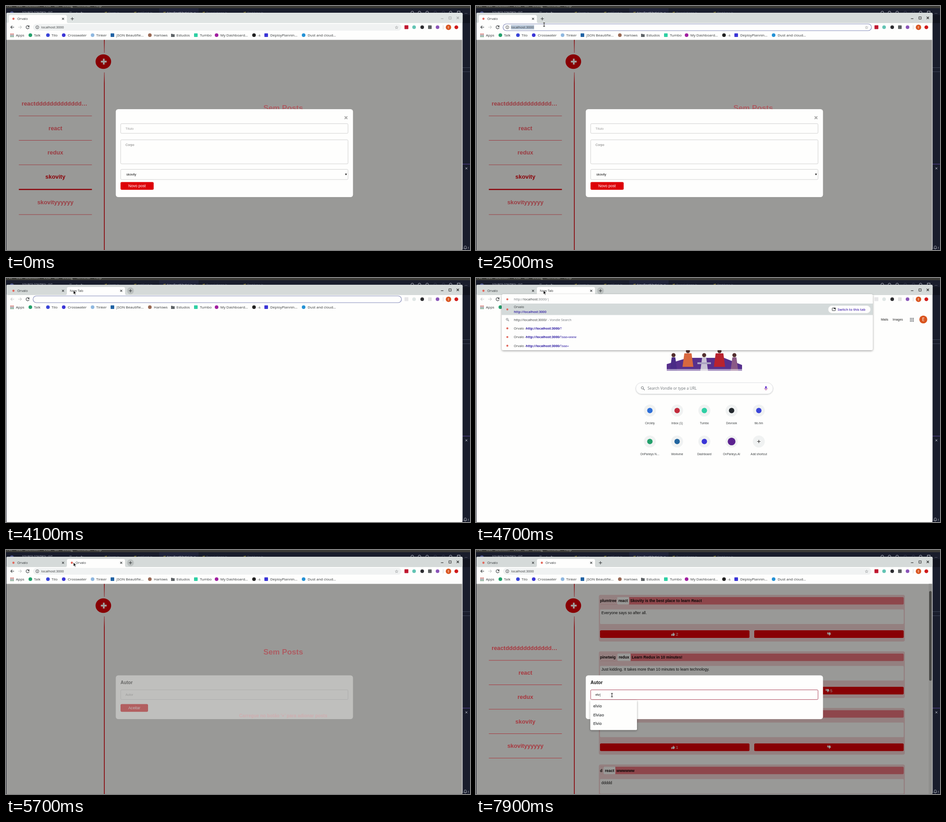
An HTML page that plays this animation: 1029x544 px, repeating every 8 s.

```html
<!DOCTYPE html>
<html lang="pt">
<head>
<meta charset="utf-8">
<style>
html, body { margin: 0; width: 100%; height: 100%; overflow: hidden; background: #fefefd }
svg { display: block; width: 100%; height: 100% }
text { white-space: pre }
.ui { font-family: "Open Sans", "Noto Sans", sans-serif }
.page { font-family: "Liberation Sans", Arial, sans-serif }
.sym { font-family: "DejaVu Sans", sans-serif }
</style>
</head>
<body>
<svg id="stage" viewBox="0 0 1029 544"></svg>
<script>
// Page colours; the dim ones lie under the modal backdrop
const RED = '#dd0008', DIM_RED = '#880004', DIM_WHITE = '#999997', INK = '#303436';

// SVG helpers
const text = (x, y, size, str, fill = INK, extra = '', font = 'ui') =>
  `<text class="${font}" x="${x}" y="${y}" font-size="${size}" fill="${fill}" ${extra}>${str}</text>`;
const page = (x, y, size, str, fill, extra) => text(x, y, size, str, fill, extra, 'page');
const rect = (x, y, w, h, fill, r = 0, extra = '') =>
  `<rect x="${x}" y="${y}" width="${w}" height="${h}" rx="${r}" fill="${fill}" ${extra}/>`;
const dot = (x, y, r, fill, extra = '') => `<circle cx="${x}" cy="${y}" r="${r}" fill="${fill}" ${extra}/>`;
const fill = (d, color, extra = '') => `<path d="${d}" fill="${color}" ${extra}/>`;
const line = (d, color, w = 1.1, extra = '') =>
  `<path d="${d}" fill="none" stroke="${color}" stroke-width="${w}" ${extra}/>`;
const group = (id, ...parts) => `<g id="${id}">${parts.join('')}</g>`;
const cross = (x, y, r, color, w = 1.1) =>
  line(`M${x - r} ${y - r}l${2 * r} ${2 * r}m0 ${-2 * r}l${-2 * r} ${2 * r}`, color, w);
const plus = (x, y, r, color, w = 1.1) => line(`M${x - r} ${y}h${2 * r}M${x} ${y - r}v${2 * r}`, color, w);
const field = (y, h, color = '#c4c4c4') =>
  rect(254.3, y, 504.2, h, '#fefefd', 2.2, `stroke="${color}" stroke-width=".8"`);
const BOLD = 'font-weight="700" ', SEMI = 'font-weight="600"', MID = 'text-anchor="middle"';

function editor() {
  const menu = [[2, 'File'], [23, 'Edit'], [42, 'Selection'], [83, 'View'], [107, 'Go'],
    [125, 'Debug'], [156, 'Terminal'], [196, 'Help']];
  const tabs = [[219, 'Form.js'], [284, 'getField.js'], [349, 'NewPostModal.js  ×'],
    [436, 'Translations.js'], [527, 'TextArea.js']];
  return rect(0, 0, 1029, 544, '#191d2c') + rect(0, 0, 1029, 5, '#3a3a36') +
    menu.map(([x, s]) => text(x, 2.2, 7.6, s, '#b5b5ae')).join('') +
    rect(340, 5, 87, 12, '#20243a') +
    dot(13, 16, 4, '#4c558c') + text(36, 17.4, 6.2, 'SOURCE CONTROL: GIT', '#a9adba') +
    text(140, 17.5, 7, '☰   ✓   ↻   ⋯', '#a9adba', '', 'sym') +
    tabs.map(([x, s], i) => text(x, 18, 6.4, 'JS', '#b5a53c', BOLD) +
      text(x + 8, 18, 7, s, i == 2 ? '#d0d2dc' : '#626780')).join('') +
    [901, 917, 934, 952, 970, 986].map((x, i) =>
      dot(x, 14.5, 3, 'none', `stroke="${i == 3 || i == 4 ? '#3c4054' : '#b9bcc8'}"`)).join('') +
    rect(1001, 11.5, 6, 6, 'none', 0, 'stroke="#c8cad2"') + text(1017, 17, 8, '…', '#c8cad2') +
    rect(1012, 20, 17, 18, '#11141f') +
    line('M1012 137.5h17M1012 146.5h17', '#3d4457', 1) + line('M1012 352.5h17', '#5c479c', 1) +
    cross(1021, 362, 2.2, '#c5c8d2', .9) +
    line('M1015 540.5h7l-1.2-1.6v-2q0-2-2.3-2t-2.3 2v2zM1017.5 542h2', '#c5c8d2', .8) +
    text(1023.5, 541.5, 7, '1', '#c5c8d2');
}

function bookmarks() {
  const items = [
    [54, 62, '#23a06b', 'Talk'], [93, 101, '#3a45d8', 'Tilo'], [128, 137, '#3a35d6', 'Crosswater'],
    [192, 200, '#8fb8e0', 'Tinker'], [236, 245, '#2163a5', 'JSON Beautifie…', 1],
    [319, 328, '#9a6a55', 'Harlows'], [0, 378, '', 'Estudos'], [421, 430, '#2fcfa4', 'Tumbo', 1],
    [467, 475.5, '#a01fa0', 'My Dashboard…'], [550, 558, '#222', '-s'],
    [577, 586, '#3a35d6', 'DeployPlannin…', 1], [660, 669, '#2492d6', 'Dust and cloud…']];
  let out = text(22, 68, 8, 'Apps');
  for (let i = 0; i < 9; i++)
    out += rect(9.5 + i % 3 * 2.9, 61.5 + (i / 3 | 0) * 2.9, 1.9, 1.9, ['#c8443c', '#4a5560', '#3a7c55'][i / 3 | 0]);
  out += fill('M366 62h3l1 1h4v6h-8z', '#5f6468');
  for (const [ix, tx, color, name, square] of items)
    out += (!ix ? '' : square ? rect(ix - 4, 61, 8, 8, color, 1) : dot(ix, 65, 4, color)) + text(tx, 68, 8, name);
  return out;
}

const tabLabel = (x, tx, s) => dot(x, 28.5, 2.4, '#e2685c') + text(tx, 31.2, 7.5, s);

function browser() {
  const ext = dim => rect(883.7, 43, 8.6, 8.6, dim ? '#e6e6e8' : '#c01830', 1) +
    dot(905, 47.3, 4, dim ? '#dfe6e5' : '#63c4b4') + dot(923, 47.3, 4, '#2c2c30') +
    rect(936, 43.3, 8, 8, dim ? '#e2e2e2' : '#5b5f60', 1);
  const backArrow = color => line('M18 47.3h-7.5m3.4-3.4l-3.4 3.4l3.4 3.4', color);
  return rect(1, 15, 1011.5, 529, '#fefefd', 3) +
    group('stripIdle', rect(1, 15, 1011.5, 23, '#dfe4e3', 3)) +
    group('stripActive', rect(1, 15, 1011.5, 23, '#d5dad9', 3)) +
    rect(1, 38, 1011, 37.5, '#fefefd') +
    group('oneTab', fill('M3 38Q6 38 6 34V24Q6 20 10 20H131Q135 20 135 24V34Q135 38 138 38z', '#fefefd'),
      group('plusHover', dot(147, 28.7, 7.7, '#a9aead')), plus(147, 28.5, 3.5, INK)) +
    group('twoTabs', fill('M132 38Q135 38 135 34V24Q135 20 139 20H260Q264 20 264 24V34Q264 38 267 38z', '#fefefd'),
      group('plusRing', dot(276, 28.5, 7.7, '#bcc1c0')), plus(276, 28.5, 3.5, INK), cross(255.5, 28.5, 2.2, INK)) +
    tabLabel(16.5, 25, 'Orvalo') + cross(126.5, 28.5, 2.2, INK) +
    group('newTabName', text(141.5, 31.2, 7.5, 'New Tab')) +
    group('loadedName', tabLabel(146, 154, 'Orvalo')) +
    ['#a2a5a5', '#222'].map((c, i) => group('win' + i, line('M964.5 28.3h5.5', c),
      rect(982.2, 24.2, 5, 5, 'none', 0, `stroke="${c}"`), cross(1002, 26.5, 2.5, c))).join('') +
    group('back', backArrow(INK)) + group('backDim', backArrow('#c4c6c6')) +
    line('M27 47.3h7.5m-3.4-3.4l3.4 3.4l-3.4 3.4', '#c4c6c6') +
    group('reload', line('M50.6 45a3.5 3.5 0 1 0 .8 3.2', INK), fill('M51.8 43v3.8h-3.8z', INK)) +
    group('stop', cross(48, 47.3, 3, INK)) +
    rect(60, 40, 817, 15, '#f0f2f2', 7.5) +
    group('focusRing', rect(60, 40, 817, 15, '#fefefd', 7.5, 'stroke="#8087b8" stroke-width="1.2"')) +
    group('selection', rect(77.5, 42.3, 51.5, 10, '#b9c8da')) +
    group('address', dot(69.5, 47.4, 3.4, 'none', `stroke="${INK}" stroke-width=".8"`),
      line('M69.5 45.3v1M69.5 47v2.4', INK, .9), text(78, 50, 7.45, 'localhost:3000'),
      text(862, 50.8, 9.5, '☆', INK, '', 'sym')) +
    group('ext', ext(false)) + group('extDim', ext(true)) +
    dot(957, 47.3, 4, '#8a54b8') + line('M969.5 43v9', '#d5d5d5') +
    dot(981.3, 47.4, 6, '#d9541e') + text(981.3, 49.8, 6.5, 'E', '#fff', MID) +
    dot(998.7, 47.4, 4.2, '#d01a1a') + bookmarks();
}

function newTab() {
  const cells = [['#2e6fd8', 'Circlely'], ['#c22b3c', 'Inbox (1)'], ['#2fcfa4', 'Tumbo'], ['#24292e', 'Devrook'],
    ['#3a45d8', 'tilo.hm'], ['#23a06b', 'OnParleys N…'], ['#22659f', 'Workvine'], ['#3a35d6', 'Dashboard'],
    ['#5c2390', 'OnParleys.AI'], ['', 'Add shortcut']];
  const people = [[438, '#4a2b86', 8], [470, '#d8683f', 16], [506, '#c9c3d4', 9], [540, '#b8232f', 17], [573, '#8a5a86', 9]];
  const art = fill('M423 207V192L470 178H550L590 194V207z', '#57308c') +
    people.map(([x, c, w]) => dot(x, w > 12 ? 163 : 172, 4.5, '#54302f') +
      fill(`M${x - w / 2} ${w > 12 ? 168 : 177}h${w}l4 30h${-w - 8}z`, c)).join('') +
    rect(491, 188, 30, 4, '#aaa2c0') + rect(423, 203, 167, 5, '#fefefd', 0, 'opacity=".5"');
  let grid = '';
  cells.forEach(([c, name], i) => {
    const x = 385.6 + i % 5 * 60.4, y = i < 5 ? 295.5 : 364.5;
    grid += dot(x, y, 13.3, '#f0f2f2') + (c ? dot(x, y, i == 8 ? 8.6 : 6, c) : plus(x, y, 3.6, '#222')) +
      page(x, y + 30, 6.45, name, '#3c4043', MID);
  });
  let apps = '';
  for (let i = 0; i < 9; i++) apps += rect(962.5 + i % 3 * 3.2, 89 + (i / 3 | 0) * 3.2, 2, 2, '#5f6368');
  return group('newTab', rect(1, 75.5, 1011, 469, '#fefefd'),
    group('search', rect(354.5, 233.5, 304, 25, '#fefefd', 12.5, 'stroke="#dfe1e5" filter="url(#soft)"'),
      dot(369, 244.8, 2.6, 'none', 'stroke="#6a6f73"'), line('M371 247l3 3', '#6a6f73'),
      text(380.5, 248.6, 8.3, 'Search Vondle or type a URL', '#70757a'),
      rect(641.2, 241, 3.6, 6, '#6c3fd0', 1.8), line('M639.6 245.3a3.4 3.4 0 0 0 6.8 0M643 248.8v2', '#b0408c', .9)),
    group('shortcuts', art, grid, page(898, 95, 6.97, 'Mails', '#222'), page(924, 95, 6.97, 'Images', '#222'), apps,
      dot(992, 92.5, 8.8, '#d9541e'), text(992, 96, 10, 'E', '#fff', MID)));
}

function suggestions() {
  const blue = '#2a18a0', gray = '#70757a';
  const row = (y, rest) => dot(69.5, y - 2.6, 2.2, '#e2685c') + text(84, y, 7.2, 'Orvalo -') +
    text(110.5, y, 7.1, `<tspan ${BOLD}>http://localhost:3000/</tspan>${rest}`, blue);
  return group('suggest', rect(57, 36, 823, 125, '#fefefd', 4, 'filter="url(#drop)"'),
    rect(57, 57, 823, 25.5, '#d4dada'), dot(69.5, 47.5, 2.2, '#e2685c'), dot(69.5, 70, 2.2, '#e2685c'),
    text(84, 67.3, 7.3, 'Orvalo'), text(84, 78, 7.2, 'http://localhost:3000', blue, SEMI),
    rect(781, 61.5, 94, 17, '#fefefd', 8.5, 'stroke="#e2e4e4"'),
    rect(790, 66.8, 7, 6, 'none', .5, `stroke="${INK}"`), rect(793.5, 66.5, 4, 2.5, INK),
    text(802, 72.8, 7.4, 'Switch to this tab', '#4a2bb0', SEMI),
    dot(69, 92, 2.1, 'none', `stroke="${gray}"`), line('M70.6 93.6l2.4 2.4', gray),
    text(84, 95.6, 7.3, `http://localhost:3000/<tspan fill="${gray}"> - Vondle Search</tspan>`),
    row(114.8, '?'), row(134.2, '?aaa=www'), row(153.6, '?aaa='),
    '<text id="typedUrl" class="ui" x="84" y="50" font-size="7.4" fill="#70757a"></text>');
}

function categories(id, ys, lines, active) {
  const names = ['reactddddddddddddd…', 'react', 'redux', 'skovity', 'skovityyyyyy'];
  const pale = active < 0 ? '#a8383f' : '#9b3c42';
  return group(id, ...names.map((s, i) => {
    const on = i == active, color = on ? '#8a0007' : pale;
    return page(i ? 109.5 : 107.5, ys[i] + 4.6, 12.87, s, color, BOLD + MID) +
      line(`M28.5 ${lines[i]}h162`, color, on ? 2.6 : 1);
  }));
}

const thumb = (x, y, dir) => fill('M-4-.3h1.8v4.3h-1.8zM-1.6-.2L.4-2.6V-4Q1.8-4 1.6-1.2H3.6Q4.4-.8 3.8.2L2.8 3.8H-.4L-1.6 3.2z',
  DIM_WHITE, `transform="translate(${x} ${y}) scale(1 ${dir})"`);

function post(i, author, tagX, tag, barX, title, body, up, down) {
  const y = 100 + 126.1 * i, panel = '#948080', button = x => rect(x, y + 79, 331.5, 17, DIM_RED, 2.5);
  return rect(272.5, y, 678.5, 104, panel, 4) + rect(275, y + 5, 673.5, 16.5, '#8e464b', 2.5) +
    rect(275, y + 5, barX - 275, 16.5, panel) + rect(tagX, y + 5, barX - tagX, 16.5, DIM_WHITE, 2) +
    page(275, y + 16.2, 8.58, author, '#0a0505', BOLD) + page(tagX + 3, y + 16.2, 8.58, tag, '#0a0505', BOLD) +
    page(barX + 2.5, y + 16.2, 8.58, title, '#0a0505', BOLD) +
    rect(275, y + 32.5, 673.5, 32.5, DIM_WHITE, 2) + page(278, y + 43.2, 8.58, body, '#0d0d0d') +
    button(275) + button(617) + thumb(437, y + 87.6, 1) + page(443.5, y + 91, 8.58, up, DIM_WHITE) +
    thumb(down ? 779.5 : 783, y + 87.6, -1) + page(785.5, y + 91, 8.58, down, DIM_WHITE);
}

function site() {
  return group('site', rect(1, 75.5, 1010.5, 469, DIM_WHITE),
    fill('M217.2 75.5h1.7l-.5 29h-.7zM217.7 148h.7l.5 24V544h-1.7V172z', '#8a060b'),
    `<ellipse cx="215.9" cy="124" rx="17.3" ry="16.2" fill="${DIM_RED}"/>`, plus(216.8, 124, 6.4, '#a09e9c', 3.9),
    categories('catsOld', [217, 272, 326.3, 380.8, 437], [245, 299.5, 354, 409, 465], 3),
    categories('catsNew', [218.3, 273, 327.4, 381.9, 436.4], [246, 300.5, 355, 409.5, 464], -1),
    group('empty', page(614.8, 233.2, 17.2, 'Sem Posts', '#ad5d63', BOLD + MID),
      page(614.8, 373.3, 10.05, "Carregue no botão '+' para adionar posts", '#b27d80', BOLD + MID)),
    group('posts',
      post(0, 'plumtree', 313, 'react', 339.5, 'Skovity is the best place to learn React', 'Everyone says so after all.', '2', ''),
      post(1, 'pinetwig', 313.5, 'redux', 343, 'Learn Redux in 10 minutes!', 'Just kidding. It takes more than 10 minutes to learn technology.', '', '5'),
      post(2, 'f', 283, 'react', 309, 'f', 'f', '1', ''),
      post(3, 'd', 283, 'react', 309, 'wwwwww', 'ddddd', '', ''),
      rect(1004, 75.5, 7.5, 469, '#8f8f8d'), rect(1005, 91.5, 5.5, 200, '#484846', 2.7)));
}

function postModal() {
  return group('postModal', rect(243.5, 230, 526, 196, '#fefefd', 5.5),
    cross(754, 249, 3, '#a9a9a9', 2.1),
    field(262.3, 21.6), page(265, 275.8, 7.15, 'Título', '#999'),
    field(298.3, 53.6), page(265, 311.9, 7.15, 'Corpo', '#777'),
    field(364.3, 22.6), page(267, 378.3, 7.15, 'skovity', '#111'),
    fill('M751.8 373.7h4.4l-2.2 4z', '#222'),
    rect(254, 392.5, 73.5, 17.2, RED, 2.7), page(290.6, 404, 8.58, 'Novo post', '#fff', MID));
}

function list(id, w, items) {
  return group(id, rect(253.5, 335, w, items.length * 19.4 + 8, '#fefefd', 2, 'filter="url(#drop)"'),
    ...items.map((s, i) => text(260, 351.3 + 19.4 * i, 8.4, s, INK, SEMI)));
}

function authorModal() {
  const names = ['elvio', 'Elviao', 'Elvio'];
  return group('authorModal', rect(243.5, 279.5, 526, 97.5, '#fefefd', 5.5),
    page(254, 299.3, 10.05, 'Autor', '#111', BOLD),
    field(311.8, 21.6),
    group('inputFocus', field(311.8, 21.6, '#a01c38')),
    group('hint', page(265, 325.3, 7.15, 'Autor', '#999')),
    '<text id="typedName" class="page" x="265" y="325.3" font-size="7.15" fill="#111"></text>',
    rect(254, 343.5, 61, 17.2, RED, 2.7), page(284.5, 355, 8.58, 'Aceitar', '#fff', MID),
    list('listAll', 336, [...names, 'teste', 'abc',
      'lorem ipsum dolor sit amet consectetur adipiscing elit sed do eiusmod']),
    list('listMatch', 103.5, names));
}

const stage = document.getElementById('stage');
stage.innerHTML = `<defs>
  <filter id="drop" x="-5%" y="-10%" width="110%" height="130%"><feDropShadow dx="0" dy="1.5" stdDeviation="2" flood-opacity=".38"/></filter>
  <filter id="soft" x="-5%" y="-20%" width="110%" height="150%"><feDropShadow dx="0" dy="1" stdDeviation="1.3" flood-opacity=".2"/></filter></defs>` +
  editor() + browser() + newTab() + site() + postModal() + authorModal() + suggestions() +
  group('arrow', fill('M0 0V9.2L2.1 7.2L3.6 10.6L5.1 10L3.6 6.6H6.5z', '#111', 'stroke="#fff" stroke-width=".8"')) +
  group('beam', line('M-2-4H2M0-4V4M-2 4H2', '#fff', 2.2), line('M-2-4H2M0-4V4M-2 4H2', '#111', 1.1));

const $ = id => document.getElementById(id);
const show = states => { for (const id in states) $(id).style.display = states[id] ? '' : 'none'; };

// time, x, y, 1 for the text cursor
const moves = [
  [700, 108, 47, 1], [800, 256.5, 170], [1000, 261, 182], [1300, 262, 205], [1400, 262, 225], [1500, 223, 113.5],
  [1800, 196, 92], [1900, 152, 64], [2000, 127, 51, 1], [2300, 133, 48, 1], [2400, 145, 44, 1], [2500, 151, 41.5, 1],
  [3200, 148, 36.5], [3400, 149.5, 27.5], [6100, 520, 300], [6200, 931, 481], [6300, 358, 384],
  [6600, 340, 362], [6700, 315, 335], [6800, 301.5, 323.5, 1]];

function draw(now) {
  const t = Math.floor(now % 8000 / 100) * 100;
  const between = (a, b) => t >= a && t < b;
  const active = t >= 2200, tab2 = t >= 4000, ready = t >= 5900;
  const blank = between(4000, 5400);

  show({
    stripIdle: !active, stripActive: active, win0: !active, win1: active,
    oneTab: !tab2, twoTabs: tab2, plusHover: t >= 3400, plusRing: t < 6100,
    newTabName: blank, loadedName: t >= 5400,
    back: !blank, backDim: blank, reload: !between(5200, 5700), stop: between(5200, 5700),
    focusRing: between(2200, 5200), selection: between(2200, 4000),
    address: t < 4000 || t >= 5200, ext: !blank, extDim: blank,
    newTab: between(4000, 5300), search: t >= 4200, shortcuts: t >= 4300, suggest: between(4400, 5200),
    site: t < 4000 || t >= 5400, catsOld: t < 4000, catsNew: ready, empty: !ready, posts: ready,
    postModal: t < 4000, authorModal: t >= 5500, inputFocus: t >= 7100, hint: t < 7700,
    listAll: between(7200, 7700), listMatch: t >= 7700
  });

  $('site').setAttribute('opacity', between(5400, 5500) ? .5 : 1);
  $('authorModal').setAttribute('opacity', Math.max(0, Math.min(1, (t - 5550) / 400)));

  $('typedUrl').innerHTML = t < 4700 ? 'http'.slice(0, (t - 4300) / 100) + '|'
    : `http://<tspan fill="${INK}">localhost</tspan>:3000/|`;
  $('typedName').textContent = t < 7700 ? (t >= 7100 ? '|' : '') : 'elv'.slice(0, (t - 7600) / 100) + '|';

  const [, x, y, beam] = moves.filter(m => m[0] <= t).pop() || [];
  show({ arrow: x && !beam, beam });
  if (x) $(beam ? 'beam' : 'arrow').setAttribute('transform', `translate(${x} ${y})`);
}

function tick(now) {
  draw(now);
  requestAnimationFrame(tick);
}
draw(0);
requestAnimationFrame(tick);
</script>
</body>
</html>
```
